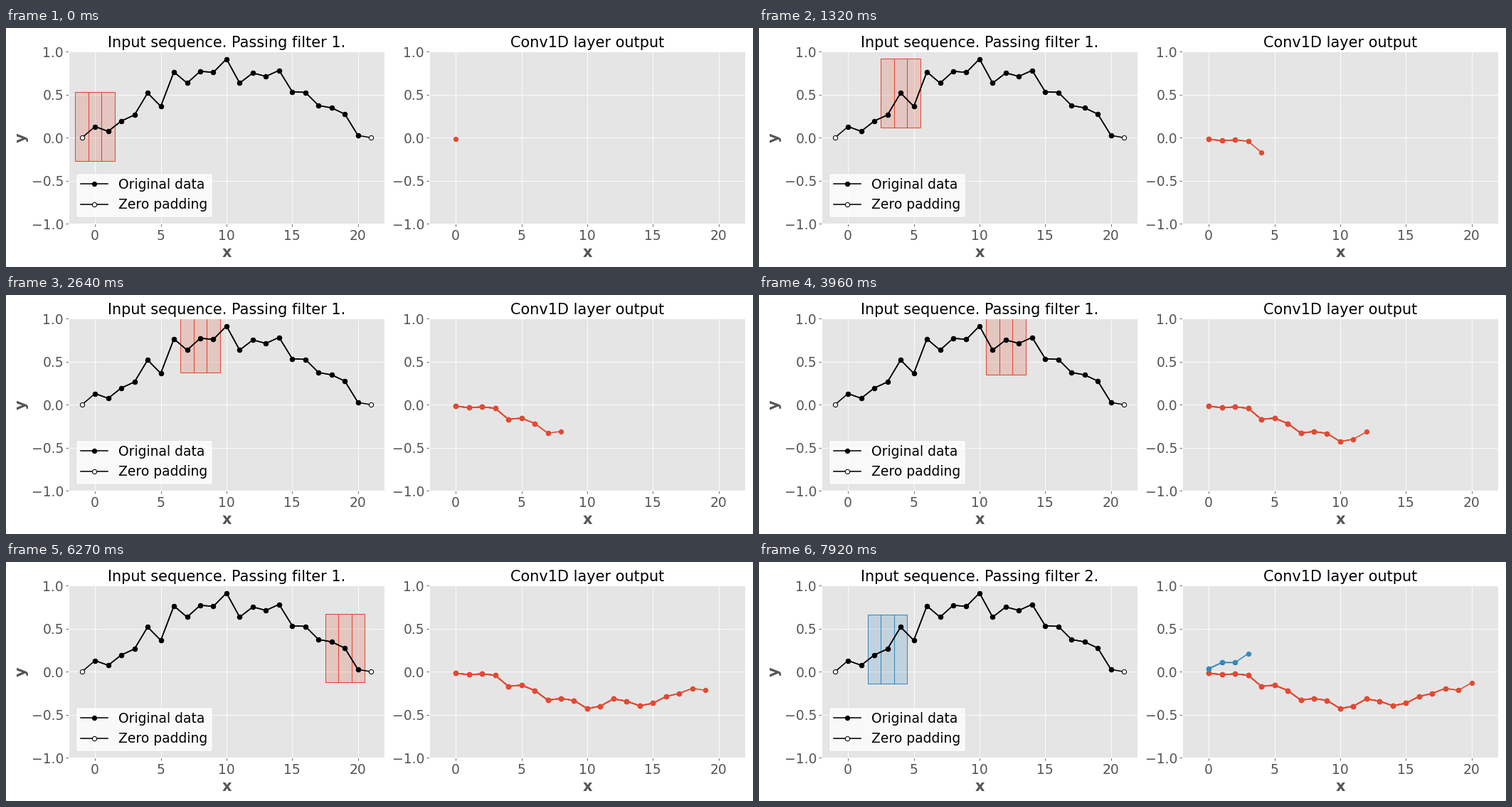
Recreate the animation shown at these times as a matplotlib script. Size 1050 px wide and 336 px high, loop 8 s.

```python
import numpy as np
import matplotlib.pyplot as plt
from matplotlib.animation import FuncAnimation
from matplotlib.colors import to_rgba
from matplotlib.patches import Rectangle

plt.style.use("ggplot")

W, H, DPI = 1050, 336, 75
LOOP, TICK, STEP = 8000, 50, 330   # ms
COLORS = ["#E24A33", "#348ABD"]
KERNELS = [(-0.438, -0.254, 0.216), (0.59, 0.23, 0.067)]
LAYERS = 6                         # repeated strokes thicken older segments

data = np.array([0.13, 0.075, 0.195, 0.265, 0.52, 0.365, 0.765, 0.635,
                 0.772, 0.76, 0.915, 0.635, 0.753, 0.713, 0.783, 0.535,
                 0.527, 0.375, 0.347, 0.275, 0.027])
N = len(data)
xs = np.arange(N)
padded = np.pad(data, 1)
outputs = [np.correlate(padded, k, "valid") for k in KERNELS]

fig = plt.figure(figsize=(W / DPI, H / DPI), dpi=DPI)


def make_axes(left, title):
    ax = fig.add_axes([left / W, (H - 275.3) / H, 443.5 / W, 242 / H])
    ax.set_xlim(-2, 22)
    ax.set_ylim(-1, 1)
    ax.set_xticks(range(0, 21, 5))
    ax.set_yticks(np.linspace(-1, 1, 5))
    ax.tick_params(labelsize=18)
    ax.set_xlabel("x", fontsize=20, fontweight="bold")
    ax.set_title(title, fontsize=20)
    return ax


ax_in = make_axes(88.2, "Input sequence. Passing filter 1.")
ax_in.set_ylabel("y", fontsize=20, fontweight="bold")
ax_out = make_axes(595.2, "Conv1D layer output")

pad_line, = ax_in.plot(np.arange(-1, N + 1), padded, "o-", color="black",
                       mfc="white", label="Zero padding")
data_line, = ax_in.plot(xs, data, "o-", color="black", label="Original data")
ax_in.legend(handles=[data_line, pad_line], loc="lower left", fontsize=18,
             facecolor="white", framealpha=0.8)

cells = [ax_in.add_patch(Rectangle((0, 0), 1, 0.8, lw=1)) for _ in range(3)]
curves = [[ax_out.plot([], [], "o-", color=c)[0] for _ in range(LAYERS)]
          for c in COLORS]


def update(frame):
    step = (frame * TICK + TICK - 10) // STEP
    which, pos = divmod(step, N)
    ax_in.title.set_text(f"Input sequence. Passing filter {which + 1}.")

    for j, cell in enumerate(cells):
        cell.set_xy((pos - 1.5 + j, data[pos] - 0.4))
        cell.set_facecolor(to_rgba(COLORS[which], 0.2))
        cell.set_edgecolor(COLORS[which])

    for k, layers in enumerate(curves):
        shown = min(max(step + 1 - k * N, 0), N)
        for j, line in enumerate(layers):
            n = max(shown - j, 0)
            line.set_data(xs[:n], outputs[k][:n])
    return []


anim = FuncAnimation(fig, update, frames=LOOP // TICK, interval=TICK,
                     repeat=True, repeat_delay=0)
plt.show()
```
